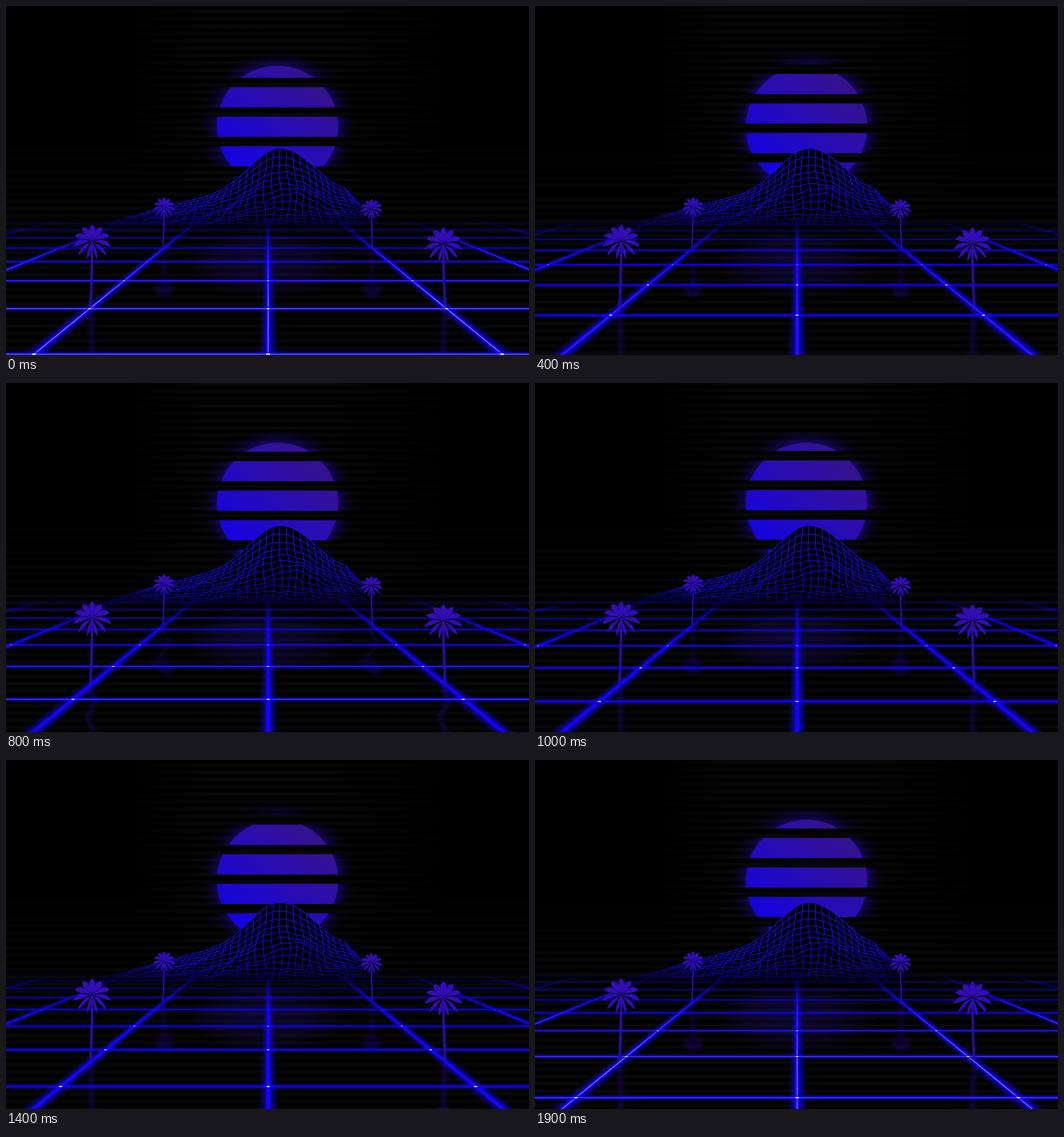
Write an HTML page with a canvas that moves like this. It is 917x611 px and loops after 2 s.

```html
<!DOCTYPE html>
<html lang="en">
<head>
<meta charset="utf-8">
<title>Neon valley</title>
<style>
html, body { margin: 0; width: 100%; height: 100%; overflow: hidden; background: #000; }
canvas { display: block; width: 917px; height: 611px; }
</style>
</head>
<body>
<canvas id="stage" width="917" height="611"></canvas>
<script>
const W = 917, H = 611, FRAMES = 20, STEP = 100;
const HORIZON = 275, CENTER = 459.6, SPREAD = 1.227;
const ROW_GAP = 0.000932;

const clamp = v => Math.max(0, Math.min(1, v));
const lerp = (a, b, t) => a + (b - a) * t;
const bell = (x, mid, width) => Math.exp(-(((x - mid) / width) ** 2));
const range = (n, f) => Array.from({ length: n }, (_, i) => f(i));

// Motion, in frames
const jolt = frame => bell(frame, 8, 1.2);
const gapTop = frame => 125.5 - 5.75 * frame - 11 * jolt(frame);
const rowPhase = frame => .003922 - .0000418 * (frame < 10 ? frame : frame - .85);
const glint = frame => (.5 + .5 * Math.cos(2 * Math.PI * frame / FRAMES)) ** 3;

function makeLayer(draw) {
  const layer = document.createElement('canvas');
  layer.width = W;
  layer.height = H;
  draw(layer.getContext('2d'));
  return layer;
}

function gradient(c, x0, y0, x1, y1, stops) {
  const g = c.createLinearGradient(x0, y0, x1, y1);
  stops.forEach(([at, color]) => g.addColorStop(at, color));
  return g;
}

function polygon(c, points) {
  c.beginPath();
  points.forEach(([x, y]) => c.lineTo(x, y));
}

// Mountain: a narrow peak on a broad base with a knob on the right shoulder
const BASE = 387, PEAK_X = 480, LEFT = 170, RIGHT = 690;

function skyline(x) {
  const left = x < PEAK_X;
  const broad = 62 * Math.max(0, 1 - ((x - PEAK_X) / (left ? 310 : 210)) ** 2);
  return BASE - broad - 76 * bell(x, PEAK_X, left ? 72 : 90) - 9 * bell(x, 594, 15);
}

function meshPoint(x, t) {
  const top = skyline(x), depth = 1 - (1 - t) ** 1.65;
  const bulge = Math.sin(Math.PI * t);
  const px = lerp(x, PEAK_X + (x - PEAK_X) * 1.3, depth) + 4 * bulge * Math.sin(x * .06 + t * 8);
  const hill = 12 * bell(px, 508, 38) * bell(t, .42, .13);
  const rough = 4 * bulge * Math.sin(x * .13 + t * 17) * Math.sin(x * .07 - t * 5);
  return [px, lerp(top, BASE, depth) - hill + rough * clamp((BASE - top) / 90)];
}

const mountain = makeLayer(c => {
  const columns = range(46, i => LEFT + i * 11.5);
  const rows = range(16, i => i / 15);
  polygon(c, [...range(131, i => [LEFT + i * 4, skyline(LEFT + i * 4)]), [RIGHT, 390], [LEFT, 390]]);
  c.fillStyle = '#000005';
  c.fill();
  c.strokeStyle = gradient(c, 0, 250, 0, 390, [[0, '#180ed8'], [.6, '#1409c8'], [.8, '#1007a0'], [.92, '#0a0460'], [1, '#04001800']]);
  c.lineWidth = 1.45;
  columns.forEach(x => { polygon(c, rows.map(t => meshPoint(x, t))); c.stroke(); });
  rows.forEach(t => { polygon(c, columns.map(x => meshPoint(x, t))); c.stroke(); });
  c.globalCompositeOperation = 'destination-in';
  c.fillStyle = gradient(c, LEFT, 0, RIGHT, 0, [[0, '#0004'], [.2, '#000d'], [.3, '#000'], [.82, '#000'], [.95, '#0000']]);
  c.fillRect(0, 0, W, H);
});

// Leaf i of a crown: fat at the top, long and drooping at the sides
const LEAVES = 11;

function leaf(c, i) {
  const angle = i / LEAVES * 2 * Math.PI - Math.PI / 2;
  const side = Math.abs(Math.cos(angle)), length = 30 + 4 * side;
  const tx = length * Math.cos(angle), ty = length * Math.sin(angle) + 5 * side;
  const bx = tx * .55, by = ty * .55 - 8 * side;
  const width = 4.8 - 1.7 * Math.sin(angle);
  const left = [], right = [], n = 16;
  for (let k = 0; k <= n; k++) {
    const s = k / n, a = 2 * s * (1 - s), b = s * s;
    const x = a * bx + b * tx, y = a * by + b * ty;
    const dx = lerp(bx, tx - bx, s), dy = lerp(by, ty - by, s);
    const w = width * Math.sin(Math.PI * s ** 1.4) * (k % 2 ? .65 : 1) / Math.hypot(dx, dy);
    left.push([x - dy * w, y + dx * w]);
    right.unshift([x + dy * w, y - dx * w]);
  }
  polygon(c, [...left, ...right]);
  c.fill();
}

const palms = [
  { x: 151, y: 412, base: 526, scale: 1, flip: 1 },
  { x: 767, y: 417, base: 526, scale: 1, flip: -1 },
  { x: 277, y: 352, base: 423, scale: .58, flip: 1 },
  { x: 641, y: 355, base: 425, scale: .58, flip: -1 }
];

function palm(c, { x, y, base, scale, flip }, girth = 2.4) {
  const height = (base - y) / scale;
  c.save();
  c.translate(x, y);
  c.scale(scale * flip, scale);
  c.fillStyle = gradient(c, 0, -30, 0, height, [[0, '#360dba'], [.4, '#300cb0'], [1, '#240a9c']]);
  c.beginPath();
  c.moveTo(-girth * .6, 0);
  c.quadraticCurveTo(-girth, height * .55, -3 - girth, height);
  c.lineTo(-3 + girth, height);
  c.quadraticCurveTo(girth, height * .55, girth * .6, 0);
  c.fill();
  range(LEAVES, i => leaf(c, i));
  c.restore();
}

const grove = makeLayer(c => palms.forEach(p => palm(c, p)));

const reflections = makeLayer(c => palms.forEach(p => {
  c.save();
  c.filter = 'blur(3px)';
  c.globalAlpha = .36;
  c.translate(0, 2 * p.base);
  c.scale(1, -1);
  palm(c, p, 4.6);
  c.restore();
}));

// Light beams running to the vanishing point
const beams = makeLayer(c => {
  const beam = (n, half) => {
    const at = (y, side) => [CENTER + (y - HORIZON) * (n * SPREAD + side * half), y];
    polygon(c, [at(365, -1), at(H, -1), at(H, 1), at(365, 1)]);
    c.fill();
  };
  c.globalCompositeOperation = 'lighter';
  for (let n = -3; n <= 3; n++) {
    const wide = 1 + Math.abs(n) * .3;
    c.fillStyle = 'rgba(14,0,255,.07)';
    for (let i = 1; i <= 10; i++) beam(n, .0052 * i * wide);
    c.fillStyle = 'rgba(16,0,255,.8)';
    beam(n, .0105 * wide);
  }
  c.globalCompositeOperation = 'destination-in';
  c.fillStyle = gradient(c, 0, 368, 0, 450, [[0, '#0000'], [.2, '#0003'], [.55, '#000b'], [1, '#000']]);
  c.fillRect(0, 0, W, H);
});

const c = document.getElementById('stage').getContext('2d');

function scanlines(frame) {
  const period = 12.8, start = (22.6 - frame) % period - period;
  const white = a => `rgba(255,255,255,${a.toFixed(4)})`;
  for (let y = start; y < H + period; y += period) {
    const edge = .017 * clamp((y - 230) / 170);
    c.fillStyle = gradient(c, 0, 0, W, 0, [[0, white(edge)], [.22, white(edge)],
      [.38, white(.017)], [.62, white(.017)], [.87, white(edge)], [1, white(edge)]]);
    c.fillRect(0, y - 3.5, W, 7);
    c.fillRect(0, y - 2, W, 4);
  }
}

function sun(top) {
  const period = 51.75, gap = 16.6;
  c.save();
  c.beginPath();
  for (let y = top - period; y < 340; y += period) c.rect(0, y + gap, W, period - gap);
  c.clip();
  c.shadowColor = '#2206a8';
  c.shadowBlur = 32;
  c.fillStyle = gradient(c, 395, 270, 535, 125, [[0, '#1503de'], [.5, '#280cb6'], [1, '#35128e']]);
  c.beginPath();
  c.arc(476, 211, 106.5, 0, 7);
  c.fill();
  c.restore();
}

function sunReflection() {
  c.save();
  c.translate(460, 453);
  c.scale(1, .42);
  const glow = c.createRadialGradient(-25, -20, 0, 0, 0, 145);
  glow.addColorStop(0, 'rgba(34,18,165,.3)');
  glow.addColorStop(.6, 'rgba(38,16,140,.2)');
  glow.addColorStop(1, 'rgba(40,12,120,0)');
  c.fillStyle = glow;
  c.fillRect(-150, -150, 300, 300);
  c.restore();
}

function floorReflections(amount) {
  if (amount < .01) return c.drawImage(reflections, 0, 0);
  for (let y = 420; y < H; y++) {
    const far = y < 526, d = y - (far ? 424 : 526);
    const sway = (far ? 9 : 6) * clamp(d / 14) * Math.sin((d - 15) / 60 * 2 * Math.PI);
    c.drawImage(reflections, 0, y, W, 1, amount * sway, y, W, 1);
  }
}

function horizontal(y, width, color, alpha) {
  c.globalAlpha = alpha;
  c.fillStyle = color;
  c.fillRect(0, y - width / 2, W, width);
}

function grid(frame) {
  c.save();
  c.drawImage(beams, 0, 0);
  c.strokeStyle = gradient(c, 0, 400, 0, 520, [[0, '#7466ff00'], [.6, '#8678ff99'], [1, '#a79cff']]);
  c.globalAlpha = glint(frame);
  c.lineWidth = 1.1;
  for (let n = -2; n <= 2; n++) {
    polygon(c, [400, H].map(y => [CENTER + n * SPREAD * (y - HORIZON), y]));
    c.stroke();
  }
  const core = clamp(glint(frame) ** 4 + .6 * jolt(frame));
  for (let i = -1; i < 9; i++) {
    const y = HORIZON + 1 / (rowPhase(frame) + i * ROW_GAP);
    if (y < 372 || y > H + 8) continue;
    const near = y - HORIZON, fade = clamp((y - 372) / 58);
    horizontal(y, near * .034, '#1200ff', .18 * fade);
    horizontal(y, near * .022, '#1200ff', .3 * fade);
    horizontal(y, Math.max(1.5, near * .0108), '#1200f6', .92 * fade);
    horizontal(y, 1, '#a99cff', core * clamp((y - 440) / 90) * .85);
    c.fillStyle = '#fff';
    c.globalAlpha = clamp((y - 425) / 60);
    for (let n = -2; n <= 2; n++) {
      c.beginPath();
      c.ellipse(CENTER + n * SPREAD * near, y, near * .011, Math.max(.5, near * .0038), 0, 0, 7);
      c.fill();
    }
  }
  c.restore();
}

function paint(frame) {
  c.fillStyle = '#000';
  c.fillRect(0, 0, W, H);
  scanlines(frame);
  sun(gapTop(frame));
  c.drawImage(mountain, 0, 0);
  sunReflection();
  floorReflections(jolt(frame));
  grid(frame);
  c.drawImage(grove, 0, 0);
}

let shown = -1;
function tick() {
  const frame = Math.floor(performance.now() / STEP) % FRAMES;
  if (frame !== shown) paint(shown = frame);
  requestAnimationFrame(tick);
}
tick();
</script>
</body>
</html>
```
